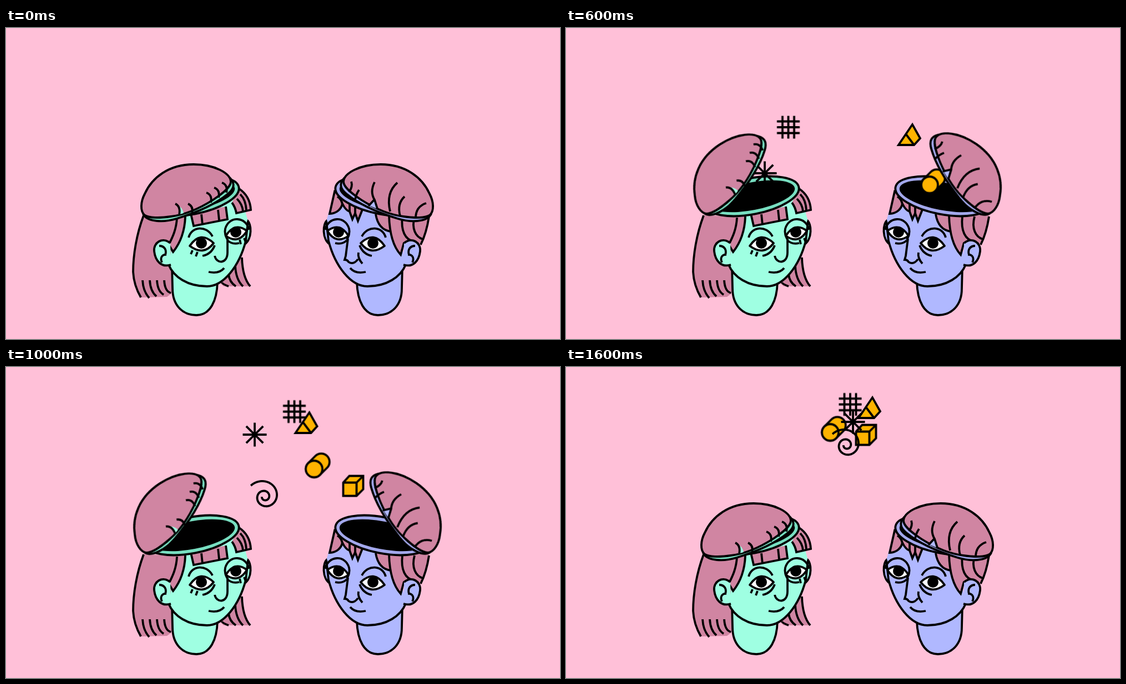
An HTML page for the animation above (2.6 s loop, 998 by 561 pixels).

```html
<!DOCTYPE html>
<html lang="en">
<head>
<meta charset="utf-8">
<title>Open minds</title>
<style>
  html, body { margin: 0; width: 100%; height: 100%; overflow: hidden; background: #ffc0d8; }
  svg { display: block; width: 100%; height: 100%; }
  .ink { fill: none; stroke: #000; stroke-width: 3.8; }
  .skin { fill: var(--skin); }
  .rim { fill: var(--rim); }
  .hair { fill: #d085a2; }
  .gold { fill: #ffb300; }
  .white { fill: #fff; }
  .bare { stroke: none; }
  .black { fill: #000; stroke: none; }
  .girl { --skin: #9fffe2; --rim: #78dfc1; }
  .boy { --skin: #b0b8ff; --rim: #a3a8ec; }
  #girlLid { transform-origin: 247px 331px; }
  #boyLid { transform-origin: 766px 331px; }
</style>
</head>
<body>
<svg viewBox="0 0 998 561" preserveAspectRatio="none">
  <defs>
    <!-- parts both heads share; the right head mirrors them -->
    <g id="base" class="ink">
      <path class="skin" d="M299 430L300 470C300 500 318 518 343 518C368 518 380 492 381 458"/>
      <path class="skin" d="M433 346C444 352 443 382 430 390"/>
      <path class="skin bare" d="M293 427C302 449 327 466 362 466C392 466 420 430 432 384L435 345L420 290L300 320L300 390Z"/>
      <path d="M293 427C302 449 327 466 362 466C392 466 420 430 432 384L436 348"/>
    </g>
    <g id="ear" class="ink">
      <path class="skin" d="M296 388C282 376 265 387 267 403C269 419 279 433 297 427"/>
      <path d="M276 393C285 393 290 400 287 409M289 409C281 408 277 415 281 423"/>
    </g>
    <g id="features" class="ink" stroke-linejoin="round">
      <path d="M329 378C334 358 361 355 372 376"/>
      <path d="M438 364C433 340 402 338 395 362C393 370 396 376 399 382"/>
      <path class="white" d="M331 393Q350 365 374 388Q356 412 331 393Z"/>
      <path class="white" d="M396 375Q412 349 434 366Q419 391 396 375Z"/>
      <circle class="black" cx="352" cy="388" r="10"/>
      <circle class="black" cx="414" cy="368" r="10"/>
      <path d="M354 411Q370 408 376 392M399 383Q407 391 420 388"/>
      <path d="M365 440Q384 444 393 433"/>
    </g>
    <g id="bowl" class="ink" transform="rotate(-11 335 303.500)">
      <ellipse class="rim" cx="335" cy="303.500" rx="86" ry="32.500"/>
      <ellipse class="black" cx="335" cy="303.500" rx="78.500" ry="25"/>
    </g>
    <g id="cap" class="ink">
      <path class="rim" d="M248 337C256 350 284 351 307 344C350 331 382 314 400 299C411 290 413 281 404 271Z"/>
      <path class="hair" d="M249 337C242 330 242 314 250 299C263 270 293 246 338 246C376 246 404 262 405 277C405 286 394 296 373 310C348 326 321 337 297 340C277 343 257 343 249 337Z"/>
    </g>
  </defs>

  <g class="girl">
    <g class="ink">
      <path class="hair bare" d="M247 338C235 370 229 410 229 440C230 460 236 475 243 486L290 485L302 476L302 340Z"/>
      <path d="M248 338C235 372 229 410 229 440C230 460 236 474 243 486"/>
      <path class="hair bare" d="M426 412C426 440 430 455 439 466L392 466L384 458Z"/>
      <path id="tails"/>
    </g>
    <use href="#base"/>
    <use href="#features"/>
    <g class="ink">
      <path d="M399 380L399 405C399 426 379 426 376 411"/>
      <path d="M336 401L333 408M345 404L342 412M421 382L423 390M429 379L432 387"/>
      <path class="hair bare" d="M249 340L323 338C322 370 312 390 301 404L290 384L264 396L246 390Z"/>
      <path d="M323 340C322 368 313 389 301 404L289 384M308 342C307 362 301 376 293 391"/>
      <path class="hair" d="M333 335L338 357L399 345L396 322"/>
      <path class="hair" d="M407 315Q413 323 415 334L441 328C440 310 432 298 420 290"/>
      <path id="fringe"/>
    </g>
    <use href="#ear"/>
    <use href="#bowl"/>
  </g>

  <g class="boy">
    <g transform="matrix(-1 0 0 1 1013 0)">
      <use href="#base"/>
      <use href="#features"/>
    </g>
    <g class="ink">
      <path d="M616 380L612 411L610 418Q615 418 617 422Q626 428 634 417M635 405Q633 415 642 425"/>
      <path class="hair" d="M592 295L583 335C596 335 604 326 606 317C610 325 614 330 619 331L624 345L629 334L634 348L643 325Z"/>
      <path d="M606 318Q604 308 597 304M619 332V318M629 336V322"/>
      <path class="hair bare" d="M666 334C669 354 678 365 693 367C695 386 704 400 711 409L717 388L748 390C755 375 758 360 762 338Z"/>
      <path d="M666 336C669 354 678 365 693 367M690 338C691 378 700 397 711 409L717 387M762 340C759 360 755 375 747 391M714 340C711 366 719 382 735 385M736 340C730 362 738 377 751 381"/>
    </g>
    <g transform="matrix(-1 0 0 1 1013 0)">
      <use href="#ear"/>
      <use href="#bowl"/>
    </g>
  </g>

  <g class="ink">
    <g id="cube">
      <path class="gold" d="M-18 -6L-7 -18H18V6L6 18H-18Z"/>
      <path d="M-18 -6H6V18M6 -6L18 -18"/>
    </g>
    <g id="tube">
      <rect class="gold" x="-24" y="-15" width="48" height="30" rx="15" transform="rotate(-45)"/>
      <circle class="gold" cx="-6.500" cy="6.500" r="15"/>
    </g>
    <g id="prism">
      <path class="gold" d="M-19 19L6 -18L20 7L9 19Z"/>
      <path d="M-6 -1L9 19"/>
    </g>
    <path id="spiral"/>
    <path id="star"/>
    <path id="grid"/>
  </g>

  <g id="girlLid" class="girl">
    <use href="#cap"/>
    <g class="ink">
      <path class="skin bare" d="M309 320C313 327 312 333 310 337L320 334C319 328 315 322 309 320Z"/>
      <path id="girlLocks"/>
    </g>
  </g>
  <g id="boyLid" class="boy">
    <use href="#cap" transform="matrix(-1 0 0 1 1013 0)"/>
    <g class="ink">
      <path class="skin bare" d="M663 309L654 320L668 326Z"/>
      <path d="M622 277Q625 286 618 296M636 292Q630 301 629 310M664 278C657 292 659 302 664 310L669 326M664 309L653 321M705 279C690 292 687 310 692 331M718 304Q704 317 710 339M757 316Q738 322 738 343"/>
    </g>
  </g>
</svg>

<script>
const LOOP = 2600, STEP = 200, LAST = 8;
const $ = id => document.getElementById(id);
const draw = (id, ...parts) => $(id).setAttribute("d", parts.flat().join(""));
const times = (n, fn) => Array.from({ length: n }, (_, i) => fn(i));

// rows of similar strands
draw("tails",
  times(4, i => `M${246 + 13 * i} 455q1 20 12 ${32 - 3 * i}`),
  times(4, i => `M${425 - 12 * i} ${414 + 15 * i}Q${426 - 12 * i} ${450 + 4 * i} ${440 - 13 * i} 466`));
draw("fringe",
  times(2, i => `M${352 + 30 * i} ${336 - 8 * i}l2 19`),
  times(2, i => `M${416 + 6 * i} ${308 - 8 * i}q10 10 11 ${23 + 6 * i}`));
draw("girlLocks",
  times(2, i => `M${305 + 23 * i} 317q10 5 7 ${20 - 4 * i}`),
  times(3, i => `M${361 + 14 * i} ${297 - 9 * i}q11 4 8 18`));

// loose shapes
draw("grid", times(3, i => `M${10.5 * (i - 1)} -20.5v41M-20.5 ${10.5 * (i - 1)}h41`));
draw("star", times(8, i => `M0 0L${21.5 * Math.cos(i * Math.PI / 4)} ${21.5 * Math.sin(i * Math.PI / 4)}`));
draw("spiral", times(91, i => {
  const t = i * 0.132, r = 32 * Math.exp(-0.156 * t), a = 3.817 + t;
  return `${i ? "L" : "M"}${r * Math.cos(a)} ${r * Math.sin(a)}`;
}));

// hold each pose for one step; the last one lasts to the end of the loop
function play(id, pose) {
  const frames = times(LAST + 1, i => ({ ...pose(i), offset: i * STEP / LOOP, easing: "steps(1, end)" }));
  frames.push({ ...pose(LAST), offset: 1 });
  $(id).animate(frames, { duration: LOOP, iterations: Infinity });
}

// three steps to open, three to close
const tilt = (id, open) => play(id, i => ({
  transform: `rotate(${open * Math.min(1, i / 3, (LAST - i) / 3)}deg)`
}));

// keys are [step, x, y]; between them the item slows down, before them it is hidden
function fly(id, ...keys) {
  play(id, i => {
    const n = Math.max(0, keys.findLastIndex(k => k[0] <= i));
    const [s, x, y] = keys[n], [e, u, v] = keys[n + 1] || [s + 1, x, y];
    const p = Math.sqrt(Math.max(0, i - s) / (e - s)) % 1;
    const at = (a, b) => a + (b - a) * p;
    return { transform: `translate(${at(x, u)}px, ${at(y, v)}px)`, opacity: i < s ? 0 : 1 };
  });
}

tilt("girlLid", -33);
tilt("boyLid", 34.5);

fly("grid", [2, 371.5, 267.5], [3, 400.5, 179], [5, 519.5, 80.5], [6, 519.5, 60], [8, 512, 67.5]);
fly("star", [3, 358, 262], [5, 448, 122], [6, 509, 107], [8, 517, 99]);
fly("spiral", [4, 355, 268], [5, 466, 234], [6, 489, 141], [8, 505, 141]);
fly("prism", [2, 644, 267], [3, 618, 192], [5, 540.5, 100], [6, 534, 80], [8, 546, 73]);
fly("tube", [2, 702, 299], [3, 661.5, 276.5], [5, 561.5, 177.5], [6, 474, 107], [8, 482.5, 111.5]);
fly("cube", [4, 668, 284], [5, 625.5, 214.5], [6, 571.5, 138.5], [8, 540.5, 122.5]);
</script>
</body>
</html>
```
